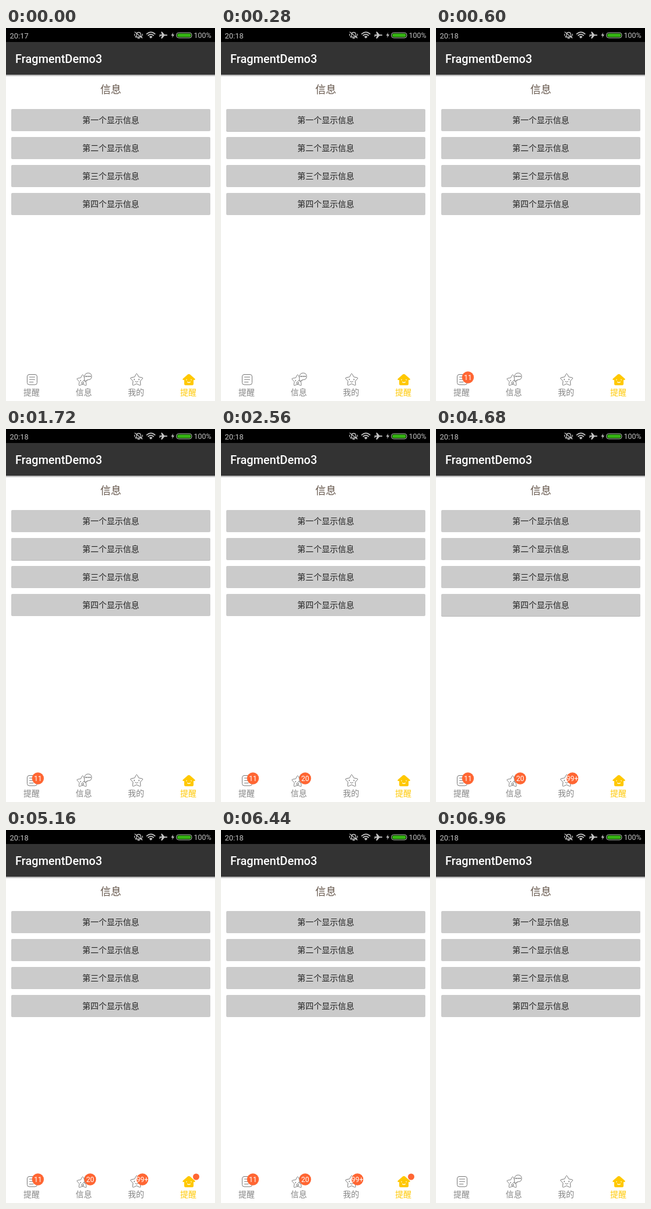
An HTML page for the animation above (7 s loop, 360 by 640 pixels).

```html
<!DOCTYPE html>
<html lang="zh-CN">
<head>
<meta charset="utf-8">
<style>
html, body { margin: 0; width: 100%; height: 100%; overflow: hidden; background: #fff; }
svg { display: block; width: 360px; height: 640px; }
text { font-family: Roboto, "Noto Sans CJK SC", "Noto Sans CJK", sans-serif; }
.mid { text-anchor: middle; }
.line { fill: none; stroke: #777; stroke-linecap: round; stroke-linejoin: round; }
.status { fill: none; stroke: #c4c4c4; stroke-width: 1.3; stroke-linecap: round; stroke-linejoin: round; }
</style>
</head>
<body>
<svg viewBox="0 0 360 640">
  <defs>
    <linearGradient id="shade" x2="0" y2="1">
      <stop stop-color="#999"/><stop offset="1" stop-color="#eee"/>
    </linearGradient>
  </defs>
  <rect width="360" height="640" fill="#fff"/>
  <rect y="80" width="360" height="3" fill="url(#shade)"/>
  <rect y="24" width="360" height="56" fill="#333"/>
  <rect width="360" height="24" fill="#000"/>

  <text id="clock" x="6.5" y="17.5" font-size="13" fill="#c4c4c4"></text>
  <g class="status">
    <path d="M223 15.5Q225 14 225 11Q225 7.5 228.5 7.5Q232 7.5 232 11Q232 14 234 15.5ZM227 17.5H230M222 7L234.5 17M221.5 10.5V13M235 10.5V13"/>
    <path d="M242.5 10.2Q249.5 4 256.5 10.2M245 12.7Q249.5 9 254 12.7" stroke-width="1.8"/>
    <path d="M247.5 15L249.5 17L251.5 15Q249.5 13.5 247.5 15Z" fill="#c4c4c4"/>
  </g>
  <path d="M264 11.2H268.5L267 6.5H269L273 11.2H276.5Q278 11.3 278 12.2Q278 13 276.5 13.2H273L269 18H267L268.5 13.2H266.5L265 15H264L264.7 12.2Z" fill="#c4c4c4"/>
  <path d="M288 7.5L284.5 13H287L286 17L290 11.3H287.3Z" fill="#c4c4c4"/>
  <rect x="293.5" y="8" width="26.5" height="9" rx="4" fill="#000" stroke="#b8c8b4"/>
  <rect x="295" y="9.5" width="23.5" height="6" rx="2.8" fill="#35b512"/>
  <text x="323.5" y="17" font-size="12.5" fill="#c4c4c4">100%</text>

  <text x="16" y="60" font-size="20" font-weight="500" fill="#fff">FragmentDemo3</text>
  <text class="mid" x="180.5" y="111.5" font-size="18" fill="#66574c">信息</text>
  <g id="buttons"></g>

  <g class="line">
    <rect x="36.5" y="594.5" width="17" height="17.5" rx="3.5"/>
    <path d="M40.5 599H49.5M40.5 603.2H49.5M40.5 607.5H47"/>
  </g>
  <g class="line" transform="translate(132 605)">
    <path class="star" transform="scale(.93)"/>
    <path d="M-3.5 -.5V.5M2 -.5V.5" stroke-width="1.3"/>
    <ellipse cx="0" cy="4" rx="1.6" ry="2"/>
    <path d="M4.2 1.5Q2.5 -2 3 -7Q4 -13 9.5 -13Q15.5 -13 15.5 -7Q15.5 -1.5 9.5 -1.5Q7 -1.5 4.2 1.5Z" fill="#fff"/>
    <path d="M6 -7.3H6.1M9.3 -7.3H9.4M12.6 -7.3H12.7" stroke="#444" stroke-width="2"/>
  </g>
  <g class="line" transform="translate(225 604)">
    <path class="star"/>
    <path d="M-4 -1.5V-.5M4 -1.5V-.5" stroke-width="1.5"/>
    <path d="M-2.5 2.5Q0 5 2.5 2.5"/>
  </g>
  <path d="M313 594.6Q315 593 317 594.6L325 601.5Q327 604 324 604H323V610.5Q323 613 320.5 613H309.5Q307 613 307 610.5V604H306Q303 604 305 601.5Z" fill="#ffc800"/>
  <path d="M311 603V604M319 603V604M312.5 607.3Q315 609.5 317.5 607.3" fill="none" stroke="#fff" stroke-width="1.2" stroke-linecap="round"/>
  <g id="tabs"></g>
  <g id="badges"></g>
</svg>
<script>
const LOOP = 7000, CLEAR = 6600;
const $ = id => document.getElementById(id);

const label = (x, y, text, fill, size = 14) =>
  `<text class="mid" x="${x}" y="${y}" font-size="${size}" fill="${fill}">${text}</text>`;

const badge = (x, text) =>
  `<g><circle cx="${x}" cy="599.5" r="10.2" fill="#ff6633"/>${label(x, 604, text, "#fff", 12)}</g>`;

function starPath() {
  const at = (i, r) => [r * Math.sin(i * Math.PI / 5), -r * Math.cos(i * Math.PI / 5)];
  const mix = (a, b, k) => a.map((v, n) => v + (b[n] - v) * k);
  let d = "";
  for (let i = 0; i < 10; i += 2) {
    const tip = at(i, 12.3), left = at(i - 1, 6.4), right = at(i + 1, 6.4);
    d += `${i ? "L" : "M"}${mix(left, tip, .65)}Q${tip} ${mix(tip, right, .35)}L${right}`;
  }
  return d + "Z";
}

document.querySelectorAll(".star").forEach(s => s.setAttribute("d", starPath()));

$("buttons").innerHTML = ["一", "二", "三", "四"].map((n, i) => {
  const y = 139 + i * 48;
  return `<rect x="9" y="${y + 1}" width="343" height="38" rx="2" fill="#bbb" opacity="0"/>
    <rect x="9" y="${y}" width="343" height="38" rx="2" fill="#cbcbcb"/>
    ${label(180.5, y + 24, `第${n}个显示信息`, "#222")}`;
}).join("");

$("tabs").innerHTML = ["提醒", "信息", "我的", "提醒"].map((name, i) =>
  label(44 + i * 90, 630, name, i == 3 ? "#ffc800" : "#858585")).join("");

$("badges").innerHTML = badge(55, "11") + badge(145, "20") + badge(235, "99+") +
  `<circle cx="327.5" cy="595" r="5.5" fill="#ff6633"/>`;

const shown = [400, 1960, 3320, 4760];
const badges = [...$("badges").children];
const shadows = [...$("buttons").querySelectorAll("rect[opacity]")];

function draw(now) {
  const t = now % LOOP;
  $("clock").textContent = t < 40 ? "20:17" : "20:18";
  shown.forEach((start, i) => {
    badges[i].style.display = t >= start && t < CLEAR ? "" : "none";
    // A pressed button lifts slightly until its badge appears.
    const lift = Math.min((t - start + 320) / 80, (start + 80 - t) / 80, 1);
    shadows[i].setAttribute("opacity", Math.max(0, lift));
  });
}

const begin = performance.now();
function tick() {
  draw(performance.now() - begin);
  requestAnimationFrame(tick);
}
tick();
</script>
</body>
</html>
```
